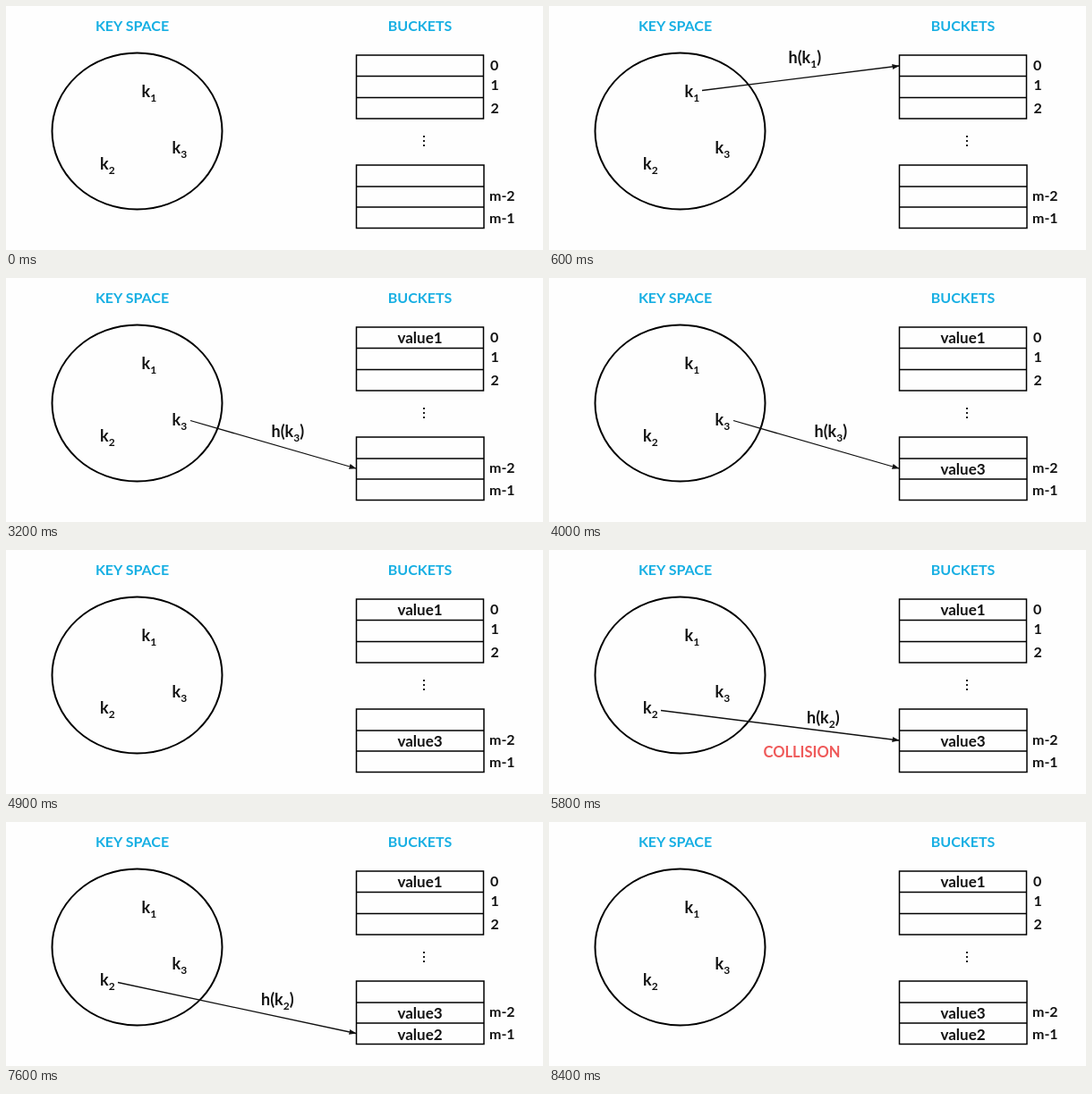
These frames come from a looping animation (600 by 273 pixels, 8.9 s). An HTML page:

```html
<!DOCTYPE html>
<html lang="en">
<head>
<meta charset="utf-8">
<title>Hash buckets</title>
<style>
  html, body { margin: 0; width: 100%; height: 100%; overflow: hidden; background: #fefefe; }
  svg { display: block; width: 100%; height: 100%; }
  text { font: bold 17px Lato, "Open Sans", sans-serif; fill: #111; }
  .title { font-size: 16px; fill: #17afe3; text-anchor: middle; }
  .alert { font-size: 16.5px; fill: #ef5a5a; text-anchor: middle; }
  .value { text-anchor: middle; }
  .index { font-size: 16px; }
  .key { font-size: 18px; }
  .sub { font-size: 12px; }
  .shape { fill: none; stroke: #000; stroke-width: 1.5; }
  .arrow { stroke: #111; stroke-width: 1.3; }
</style>
</head>
<body>
<svg viewBox="0 0 600 273">
  <defs>
    <marker id="head" markerUnits="userSpaceOnUse" markerWidth="8" markerHeight="6" refX="7.5" refY="3" orient="auto">
      <path d="M0 0L8 3L0 6Z" fill="#111"/>
    </marker>
  </defs>
  <ellipse class="shape" cx="146.5" cy="140" rx="95" ry="87.5" style="stroke-width:2"/>
  <path class="shape" d="M391.5 55H533.5V126H391.5ZM391.5 78.5H533.5M391.5 102.5H533.5"/>
  <path class="shape" d="M391.5 178H534V248.5H391.5ZM391.5 202H534M391.5 225H534"/>
  <path d="M466 145h2v2h-2zM466 150h2v2h-2zM466 155h2v2h-2z" fill="#222"/>
</svg>
<script>
const LOOP = 8900;
const svg = document.querySelector("svg");
const timed = [];

function add(markup, from = 0, to = LOOP) {
  const group = document.createElementNS("http://www.w3.org/2000/svg", "g");
  group.innerHTML = markup;
  svg.append(group);
  timed.push({ group, from, to });
}

const text = (cls, x, y, content) => `<text class="${cls}" x="${x}" y="${y}">${content}</text>`;
const key = n => `k<tspan class="sub" dy="4.5">${n}</tspan>`;
const hash = n => `h(${key(n)}<tspan dy="-4.5">)</tspan>`;
const arrow = (x1, y1, x2, y2) =>
  `<line class="arrow" x1="${x1}" y1="${y1}" x2="${x2}" y2="${y2}" marker-end="url(#head)"/>`;

add(text("title", 141, 28, "KEY SPACE") + text("title", 462.5, 28, "BUCKETS"));
add(text("key", 151.5, 102, key(1)) + text("key", 105, 183, key(2)) + text("key", 185.5, 165, key(3)));
[[541, 72, "0"], [541.5, 94, "1"], [541.5, 120, "2"], [540, 218, "m-2"], [540, 243, "m-1"]]
  .forEach(([x, y, label]) => add(text("index", x, y, label)));

add(arrow(171, 94.5, 391, 67) + text("key", 267.5, 64, hash(1)), 500, 2300);
add(text("value", 462.5, 72.5, "value1"), 1400);
add(arrow(206, 159.5, 391, 213) + text("key", 296.5, 178, hash(3)), 3200, 4900);
add(text("value", 462.5, 219.5, "value3"), 4000);
add(arrow(125, 179.5, 391, 213) + text("key", 288, 194, hash(2))
  + text("alert", 282.5, 232, "COLLISION"), 5700, 6600);
add(arrow(125, 179.5, 391, 236.5) + text("key", 285, 205, hash(2)), 6600, 8300);
add(text("value", 462.5, 243.5, "value2"), 7500);

function draw(now) {
  const t = now % LOOP;
  for (const { group, from, to } of timed)
    group.style.display = t >= from && t < to ? "" : "none";
  requestAnimationFrame(draw);
}
draw(performance.now());
</script>
</body>
</html>
```
